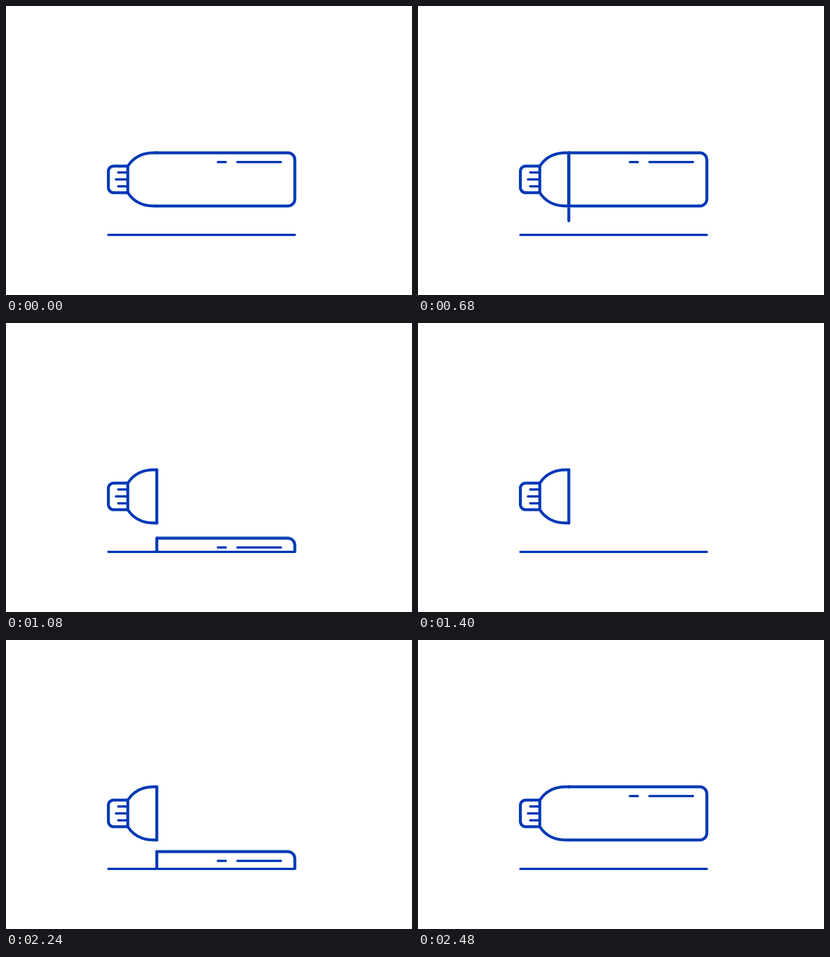
An HTML page for the animation above (3600 ms loop, 700 by 500 pixels).

```html
<!DOCTYPE html>
<html lang="en">
<head>
<meta charset="utf-8">
<title>Bottle cut</title>
<style>
  @property --lead { syntax: "<length>"; inherits: true; initial-value: 0px; }
  @property --trail { syntax: "<length>"; inherits: true; initial-value: 0px; }

  html, body { margin: 0; width: 100%; height: 100%; overflow: hidden; background: #fff; }

  svg {
    display: block;
    width: 700px;
    height: 500px;
    fill: none;
    stroke: #0039b6;
    stroke-width: 5;
    stroke-linecap: round;
    stroke-linejoin: round;
    animation: lead 3.6s infinite, trail 3.6s infinite;
  }

  .thin { stroke-width: 4; }

  /* The blade is the stretch between trail and lead. */
  .blade {
    stroke-dasharray: max(0px, var(--lead) - var(--trail)) 400px;
    stroke-dashoffset: calc(-1 * var(--trail));
    animation: blade 3.6s step-end infinite;
  }

  /* The cut follows the lead; it starts 25.5px below the blade's start. */
  .cut { stroke-dasharray: max(0px, var(--lead) - 25.5px) 400px; }

  .body { animation: sink 3.6s infinite; }

  @keyframes lead {
    0% { --lead: 0px; animation-timing-function: cubic-bezier(.333, 0, .667, 1); }
    17.222%, 68.86% { --lead: 143px; animation-timing-function: step-end; }
    68.87%, 100% { --lead: 0px; }
  }

  @keyframes trail {
    0% { --trail: 0px; }
    5.833% { --trail: 0px; animation-timing-function: cubic-bezier(.333, 0, .667, 1); }
    23.056%, 68.86% { --trail: 143px; animation-timing-function: step-end; }
    68.87%, 100% { --trail: 0px; }
  }

  @keyframes blade {
    0% { opacity: 0; }
    .1% { opacity: 1; }
    23%, 100% { opacity: 0; }
  }

  @keyframes sink {
    0% { transform: translateY(0); }
    20% { transform: translateY(0); animation-timing-function: cubic-bezier(.333, 1, .667, 1); }
    42.778% { transform: translateY(143.5px); }
    52.222% { transform: translateY(143.5px); animation-timing-function: cubic-bezier(.333, 0, .667, 0); }
    68.87%, 100% { transform: translateY(0); }
  }
</style>
</head>
<body>
<svg viewBox="0 0 700 500">
  <clipPath id="above"><path d="M0 0H700V397H0Z"/></clipPath>

  <path d="M210 277H185.500A9 9 0 0 0 176.500 286V314A9 9 0 0 0 185.500 323H210Z"/>
  <path class="thin" d="M193.500 288H210M189.500 300H210M193.500 312H210"/>
  <path d="M260 254H255C234 254 219 263 210 277M210 323C219 337 234 346 255 346H260"/>
  <path class="cut" d="M260 254V346"/>

  <g clip-path="url(#above)">
    <g class="body">
      <path d="M260 254H486A12 12 0 0 1 498 266V334A12 12 0 0 1 486 346H260"/>
      <path class="cut" d="M260 254V346"/>
      <path class="thin" d="M365.300 270H379M399 270H474"/>
    </g>
  </g>

  <path class="blade" d="M260 228.500V371.500"/>
  <path class="thin" d="M176.500 396H498"/>
</svg>
</body>
</html>
```
